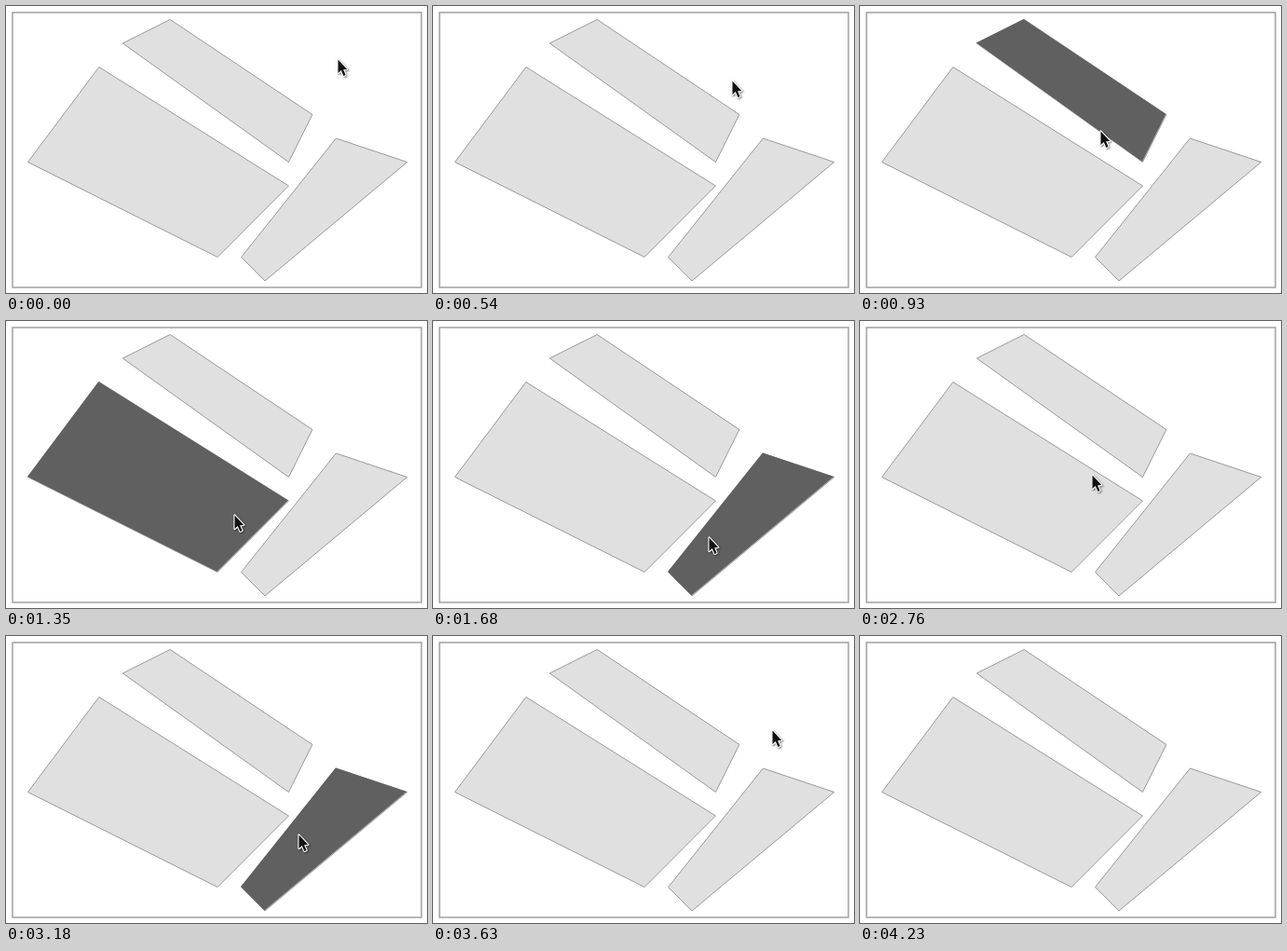
Animation, 452 px wide and 308 px high, one loop 4530 ms. Source, as an HTML page with a canvas:

```html
<!DOCTYPE html>
<html lang="en">
<head>
<meta charset="utf-8">
<title>Hover polygons</title>
<style>
  html, body { margin: 0; width: 100%; height: 100%; overflow: hidden; background: #fff; }
  canvas { display: block; }
</style>
</head>
<body>
<canvas id="stage" width="452" height="308"></canvas>
<script>
const ctx = document.getElementById('stage').getContext('2d');
const STEP = 30, STEPS = 151, LEAVE = 141;

const polygon = points => new Path2D('M' + points.join('L') + 'Z');

// Shape corners lie on a regular grid of cells
const onGrid = ([col, row]) => [23.5 + 25.45 * col, 14.5 + 25.5 * row];
const shapes = [
  [[4, 1], [6, 0], [12, 4], [11, 6]],
  [[3, 2], [11, 7], [8, 10], [0, 6]],
  [[13, 5], [16, 6], [10, 11], [9, 10]]
].map(cells => polygon(cells.map(onGrid)));

const arrow = polygon([[0, 0], [0, 14.6], [3.3, 11.6], [5.9, 17.4], [8.1, 16.4], [5.6, 10.8], [9.8, 10.4]]);

// Turning points of the pointer
const path = [
  { t: 7, x: 356, y: 56 },
  { t: 31, x: 258, y: 133 },
  { t: 45, x: 245, y: 207 },
  { t: 58, x: 305, y: 228 },
  { t: 70, x: 337, y: 151 },
  { t: 85, x: 252, y: 112 },
  { t: 92, x: 249, y: 164 },
  { t: 98, x: 258, y: 204 },
  { t: 108, x: 325, y: 206 },
  { t: 121, x: 364, y: 100 },
  { t: 133, x: 289, y: 13 },
  { t: 140, x: 237, y: -8 }
];
const first = path[0], last = path[path.length - 1];

function slope(i, axis) {
  if (i === 0) return 0;
  const a = path[i - 1], b = path[i + 1] || last;
  return (b[axis] - a[axis]) / (b.t - a.t);
}

// Cubic Hermite curve through the turning points
function pointerAt(t) {
  if (t <= first.t) return first;
  if (t >= last.t) return last;
  const i = path.findIndex(p => p.t > t) - 1;
  const a = path[i], b = path[i + 1], span = b.t - a.t;
  const u = (t - a.t) / span, v = 1 - u;
  const along = k =>
    a[k] * v * v * (1 + 2 * u) + b[k] * u * u * (3 - 2 * u) +
    span * u * v * (v * slope(i, k) - u * slope(i + 1, k));
  return { x: along('x'), y: along('y') };
}

function drawShape(shape, active) {
  ctx.fillStyle = '#e0e0e0';
  ctx.strokeStyle = '#999';
  ctx.lineWidth = 1;
  ctx.fill(shape);
  ctx.stroke(shape);
  if (!active) return;
  ctx.save();
  ctx.translate(-0.5, -0.5);
  ctx.fillStyle = '#606060';
  ctx.fill(shape);
  ctx.restore();
}

function drawPointer({ x, y }) {
  ctx.save();
  ctx.translate(Math.round(x) + 0.5, Math.round(y) + 1.5);
  ctx.lineJoin = 'round';
  ctx.lineWidth = 2.2;
  ctx.strokeStyle = '#fff';
  ctx.shadowColor = 'rgba(0, 0, 0, 0.5)';
  ctx.shadowBlur = 2;
  ctx.shadowOffsetX = ctx.shadowOffsetY = 1;
  ctx.stroke(arrow);
  ctx.shadowColor = 'transparent';
  ctx.fillStyle = '#111';
  ctx.fill(arrow);
  ctx.restore();
}

function draw(t) {
  ctx.fillStyle = '#fff';
  ctx.fillRect(0, 0, 452, 308);
  ctx.strokeStyle = '#a0a0a0';
  ctx.lineWidth = 1.5;
  ctx.strokeRect(7, 7, 439, 295);

  // The highlight trails the pointer by one step
  const hit = pointerAt(t - 1);
  for (const shape of shapes) drawShape(shape, ctx.isPointInPath(shape, hit.x, hit.y));
  if (t < LEAVE) drawPointer(pointerAt(t));
}

const start = performance.now();
function tick() {
  draw(Math.floor((performance.now() - start) / STEP) % STEPS);
  requestAnimationFrame(tick);
}
tick();
</script>
</body>
</html>
```
